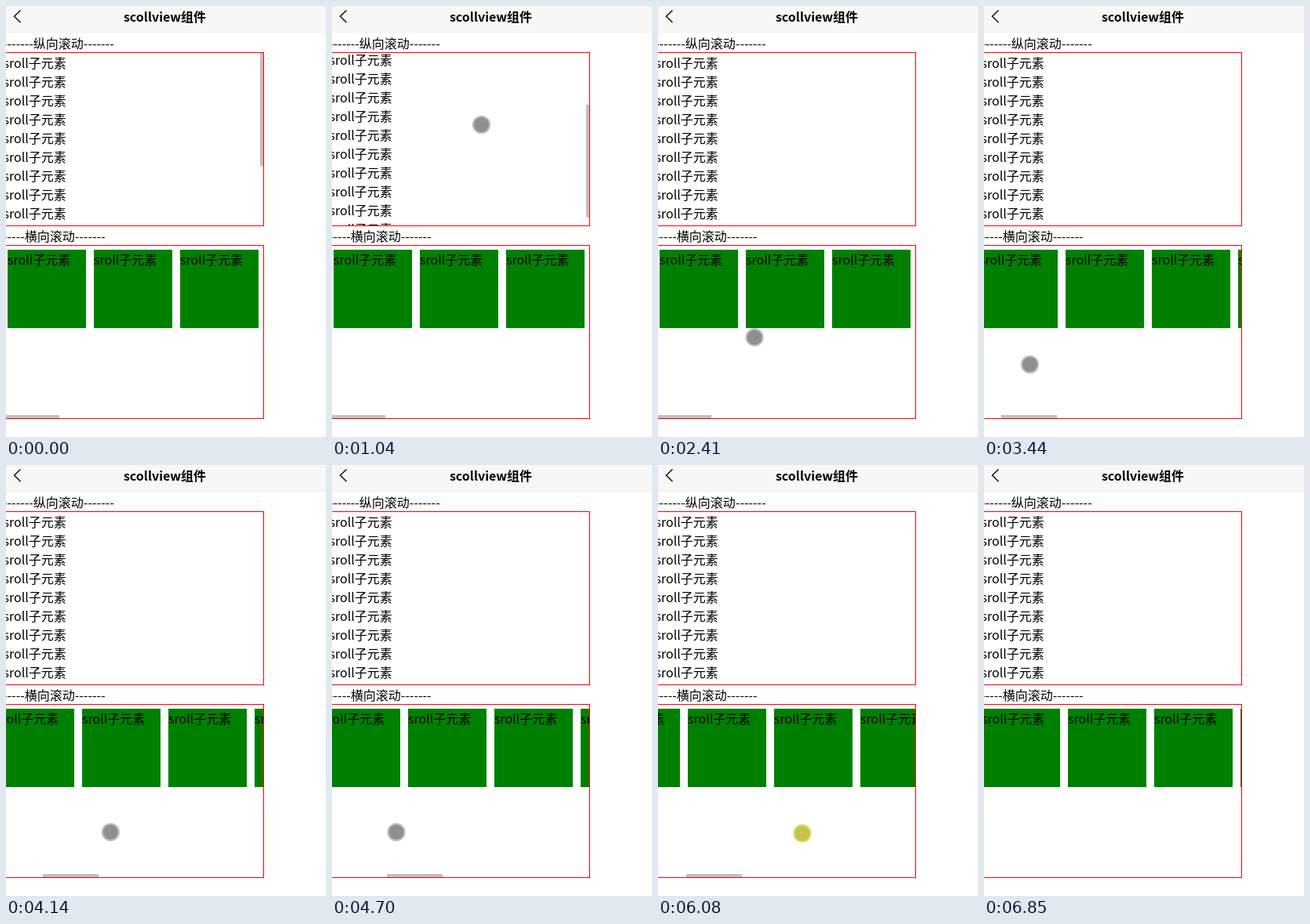
An HTML page that plays this animation: 408x550 px, repeating every 7.05 s.

```html
<!DOCTYPE html>
<html lang="zh-CN">
<head>
<meta charset="utf-8">
<title>scollview</title>
<style>
  html, body { margin: 0; width: 100%; height: 100%; overflow: hidden; background: #fff; }
  svg { display: block; width: 408px; height: 550px; }
  text { font: 16px "Noto Sans CJK SC", "Noto Sans CJK", "Noto Sans", sans-serif; white-space: pre; }
  .title { font-weight: 700; text-anchor: middle; }
  .frame { fill: none; stroke: #f00; }
  .thumb { fill: #c0c0c0; }
</style>
</head>
<body>
<svg viewBox="0 0 408 550">
  <clipPath id="listClip"><rect x="-4" y="60" width="332" height="220"/></clipPath>
  <clipPath id="rowClip"><rect x="-4" y="306" width="332" height="220"/></clipPath>

  <rect width="408" height="35" fill="#f7f7f7"/>
  <path d="M18.5 5.5 10.5 13.3 18.5 21" fill="none" stroke="#111" stroke-width="1.5"/>
  <text class="title" x="202.5" y="20">scollview组件</text>

  <text x="-4" y="54">-------纵向滚动-------</text>
  <g clip-path="url(#listClip)"><g id="list"></g></g>
  <rect id="vThumb" class="thumb" x="324" width="4" height="144"/>
  <rect class="frame" x="-4.5" y="59.5" width="333" height="221"/>

  <text x="-4" y="300">-----横向滚动-------</text>
  <g clip-path="url(#rowClip)"><g id="row"></g></g>
  <rect id="hThumb" class="thumb" y="522" width="71" height="4"/>
  <rect class="frame" x="-4.5" y="305.5" width="333" height="221"/>

  <circle id="cursor" r="10.5" stroke-width="2.2"/>
</svg>
<script>
const LOOP = 7050;
const ENTER = 130, LEAVE = 6570;
const APPROACH = 140, DRAG = 350;
const LABEL = 'sroll子元素';
const $ = id => document.getElementById(id);

const mix = (a, b, p) => a + (b - a) * p;
const progress = (t, start, end) => Math.min(1, Math.max(0, (t - start) / (end - start)));
const ease = (t, start, end) => Math.sin(progress(t, start, end) * Math.PI / 2);
const curve = (a, b, c, p) => mix(mix(a, b, p), mix(b, c, p), p);

// Each leg of the pointer's path bends toward a control point.
const legs = [];
let spot = { x: 404, y: 348 };
function move(start, end, x, y, held = false, bend = { x: (spot.x + x) / 2, y: (spot.y + y) / 2 }) {
  const to = { x, y };
  legs.push({ start, end, from: spot, to, bend, held });
  spot = to;
}

function swipe(start, x1, x2, y) {
  move(start - APPROACH, start, x1, y);
  move(start, start + DRAG, x2, y, true);
}

move(ENTER, 690, 190.5, 151.5, false, { x: 420, y: 140 });
move(1850, 2200, 209, 265, false, { x: 212, y: 170 });
move(2200, 2550, 74, 461, false, { x: 132, y: 446 });
swipe(2970, 176.5, 58.5, 457.5);
swipe(3720, 190, 73, 468.5);
swipe(4210, 192, 82, 468.5);
swipe(5110, 135.5, 193, 473.5);
swipe(5870, 80, 252.5, 470);
move(6290, 6500, 337.5, 545);

function pointerAt(t) {
  const leg = legs.filter(l => l.start <= t).pop() || legs[0];
  const p = progress(t, leg.start, leg.end);
  return {
    x: curve(leg.from.x, leg.bend.x, leg.to.x, p),
    y: curve(leg.from.y, leg.bend.y, leg.to.y, p),
    held: leg.held && t < leg.end
  };
}

// Dragging carries the cards along with the pointer.
const cardScroll = t => legs.filter(l => l.held).reduce(
  (sum, l) => sum + (l.from.x - l.to.x) * progress(t, l.start, l.end), 0);

const listScroll = t =>
  100 * ease(t, 830, 1040) + 16 * ease(t, 1110, 1310) - 116 * ease(t, 1440, 1650);

function add(parent, tag, attrs, content = '') {
  const el = document.createElementNS('http://www.w3.org/2000/svg', tag);
  for (const name in attrs) el.setAttribute(name, attrs[name]);
  el.textContent = content;
  parent.append(el);
}

for (let i = 0; i < 14; i++) {
  add($('list'), 'text', { x: -3.5, y: 79 + 24 * i }, LABEL);
  const x = 2 + 110 * i;
  add($('row'), 'rect', { x, y: 311, width: 100, height: 100, fill: '#008000' });
  add($('row'), 'text', { x, y: 330 }, LABEL);
}

function set(id, attrs) {
  for (const name in attrs) $(id).setAttribute(name, attrs[name]);
}

function draw(t) {
  const down = Math.round(listScroll(t)), left = Math.round(cardScroll(t));
  set('list', { transform: `translate(0 ${-down})` });
  set('vThumb', { y: Math.round(60 + down * 0.655), opacity: t < 1720 ? 1 : 0 });
  set('row', { transform: `translate(${-left} 0)` });
  set('hThumb', {
    x: Math.round(-3 + left * 0.2125),
    opacity: t < 6710 ? 1 : t < 6850 ? 0.5 : 0
  });

  const { x, y, held } = pointerAt(t);
  set('cursor', {
    cx: x, cy: y,
    fill: held ? '#c4c44c' : '#8f8f8f',
    stroke: held ? '#dada60' : '#bdbdbd',
    opacity: t >= ENTER && t < LEAVE ? 1 : 0
  });
}

const begin = performance.now();
function tick() {
  draw((performance.now() - begin) % LOOP);
  requestAnimationFrame(tick);
}
tick();
</script>
</body>
</html>
```
